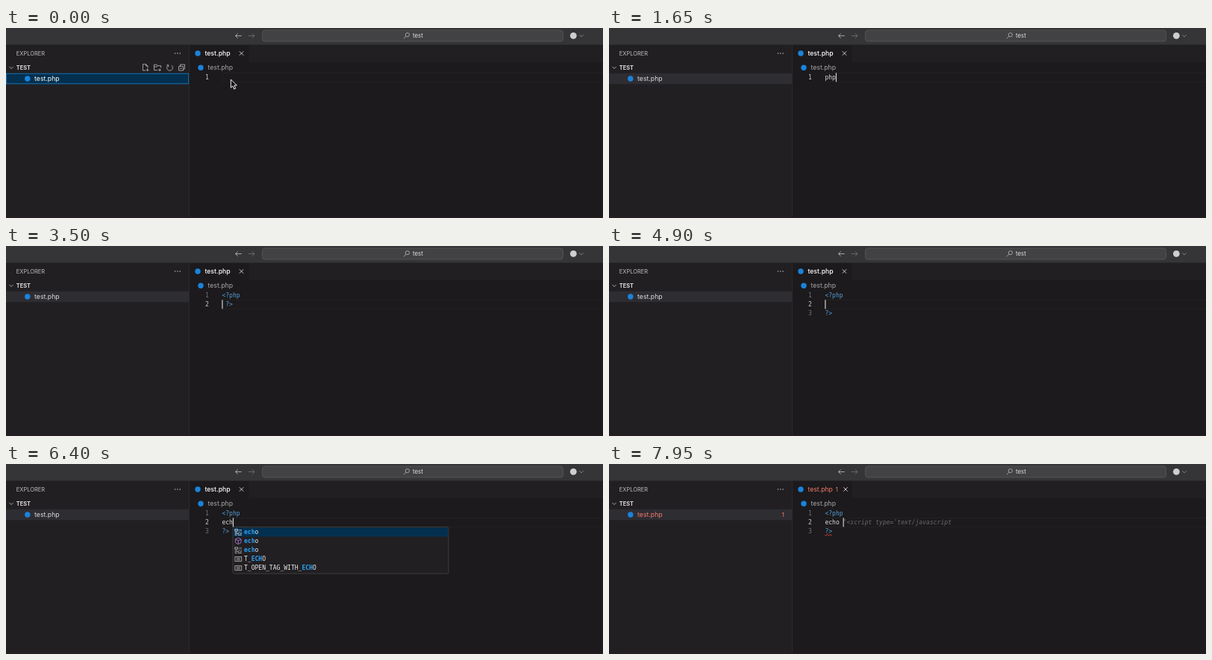
Write an HTML page with a canvas that moves like this. It is 800 px wide and 255 px high and loops after 8000 ms.

```html
<!DOCTYPE html>
<html lang="en">
<head>
<meta charset="utf-8">
<title>Code editor</title>
<style>
html, body { margin: 0; width: 100%; height: 100%; overflow: hidden; background: #1c1a1c; }
canvas { display: block; width: 800px; height: 255px; }
</style>
</head>
<body>
<canvas id="stage"></canvas>
<script>
const W = 800, H = 255, LOOP = 8000;
const canvas = document.getElementById('stage');
const g = canvas.getContext('2d');
const dpr = window.devicePixelRatio || 1;
canvas.width = W * dpr;
canvas.height = H * dpr;

const UI = 'Inter, "Open Sans", sans-serif';
const MONO = '"DejaVu Sans Mono", monospace';
const CODE = `8.05px ${MONO}`;
const CHAR = 4.847, LINE = 12.1, LEFT = 289.4, TOP = 60.2;
const BG = '#1c1a1c', SIDE = '#211f22', BLUE = '#569cd6', RED = '#f17a6c', LIGHT = '#dddcdd', HIT = '#2aa3f8';
const FOCUS = 250, ERROR = 7400;

// time, lines, caret row, caret column
const edits = [
  [FOCUS, [''], 0, 0],
  [1250, ['p'], 0, 1],
  [1400, ['ph'], 0, 2],
  [1600, ['php'], 0, 3],
  [2450, ['<?php  ?>'], 0, 6],
  [3100, ['<?php', ' ?>'], 1, 0],
  [3550, ['<?php', '', ' ?>'], 2, 0],
  [3700, ['<?php', '', '?>'], 2, 0],
  [4500, ['<?php', '', '?>'], 1, 0],
  [6000, ['<?php', 'e', '?>'], 1, 1],
  [6200, ['<?php', 'ec', '?>'], 1, 2],
  [6350, ['<?php', 'ech', '?>'], 1, 3],
  [6500, ['<?php', 'echo', '?>'], 1, 4],
  [6800, ['<?php', 'echo ', '?>'], 1, 5]
];

// first letter: m method, k keyword, c constant, s snippet; brackets mark the match
const menus = [
  { from: 1700, to: 2450, detail: 'php', items: [
    's[php]', 'm[php]_check_syntax', 'm[php]_ini_loaded_file', 'm[php]_ini_scanned_files',
    'm[php]_logo_guid', 'm[php]_sapi_name', 'm[php]_strip_whitespace', 'm[php]_uname',
    'm[php]credits', 'm[php]info', 'm[php]version', 'm[p]cntl_signal_dis[p]atc[h]'] },
  { from: 6050, to: 6200, detail: 'end(object|array &$array): mixed', scroll: true, items: [
    'm[e]nd', 'm[e]xp', 'k[e]cho', 'k[e]num', 'k[e]val', 'k[e]xit', 'm[e]xec', 'k[e]mpty',
    'm[e]xpm1', 'm[e]xplode', 'm[e]xtract', 'm[e]rror_log'] },
  { from: 6200, to: 6350, items: ['k[ec]ho', 'm[ec]ho', 'k[ec]ho', 'cT_[EC]HO', 'cT_OPEN_TAG_WITH_[EC]HO'] },
  { from: 6350, to: 6500, items: ['k[ech]o', 'm[ech]o', 'k[ech]o', 'cT_[ECH]O', 'cT_OPEN_TAG_WITH_[ECH]O'] },
  { from: 6500, to: 6800, items: ['k[echo]', 'm[echo]', 'k[echo]', 'cT_[ECHO]', 'cT_OPEN_TAG_WITH_[ECHO]'] }
];

function text(s, x, y, color, font, align = 'left') {
  g.font = font;
  g.fillStyle = color;
  g.textAlign = align;
  g.fillText(s, x, y);
}

function rect(x, y, w, h, color) {
  g.fillStyle = color;
  g.fillRect(x, y, w, h);
}

function roundBox(x, y, w, h, r, fill, stroke) {
  g.beginPath();
  g.roundRect(x, y, w, h, r);
  if (fill) { g.fillStyle = fill; g.fill(); }
  if (stroke) { g.strokeStyle = stroke; g.lineWidth = 0.8; g.stroke(); }
}

function dot(x, y, r, color) {
  g.fillStyle = color;
  g.beginPath();
  g.arc(x, y, r, 0, Math.PI * 2);
  g.fill();
}

// strokes an SVG path centred on x, y
function icon(d, x, y, color, width = 0.8) {
  g.save();
  g.translate(x, y);
  g.strokeStyle = color;
  g.lineWidth = width;
  g.stroke(new Path2D(d));
  g.restore();
}

const CHEVRON = 'M-2.6-1.3L0 1.4L2.6-1.3';
const CROSS = 'M-2.7-2.7L2.7 2.7M2.7-2.7L-2.7 2.7';
const ARROW = 'M4.2 0H-4M-.8-3.2L-4 0L-.8 3.2';
const kinds = {
  m: ['M0-4.3L3.8-2.3V2.2L0 4.3L-3.8 2.2V-2.3ZM-3.8-2.3L0-.3L3.8-2.3M0-.3V4.3', '#b180d7'],
  k: ['M-4.6-3.6H-.6V-1.4H-4.6ZM1-2.5H4.6M-4.6 .3H-1.4M.2 .3H2M3.2 .3H4.6M-4.6 2.2H1.2M2.6 2.2H4.6M-4.6 4H-2M-.6 4H4.6', '#c5c5c5'],
  c: ['M-4.4-3H4.4V3H-4.4ZM-2.5-1H2.5M-2.5 1H2.5', '#c5c5c5'],
  s: ['M-3.8 3.4V-3.8H3.8V3.4M-3.8 3.9H3.8', '#c5c5c5']
};

function titleBar() {
  rect(0, 0, W, 22.5, '#353436');
  icon(ARROW, 311.5, 10.5, '#c4c3c4');
  icon('M-4.2 0H4M.8-3.2L4 0L.8 3.2', 329, 10.5, '#757476');
  roundBox(343.5, 3, 403, 15, 3.5, '#424143', '#59585a');
  icon('M-3.6 4L-.6 .8M4 -1.2A2.6 2.6 0 1 1 -1.2-1.2A2.6 2.6 0 1 1 4-1.2', 536.5, 10.3, '#c4c3c4', 0.7);
  text('test', 544.9, 13.2, LIGHT, `7.9px ${UI}`);
  dot(760.3, 10.3, 4.4, '#cfcecf');
  icon(CHEVRON, 771, 10.5, '#a5a4a5', 0.7);
}

function sidebar(focused, error) {
  rect(0, 22.5, 245, H, SIDE);
  text('EXPLORER', 13.8, 36.8, '#bfbebf', `7.5px ${UI}`);
  for (let i = -1; i < 2; i++) dot(229.8 + i * 3.3, 34, 0.75, '#c4c3c4');
  icon(CHEVRON, 7, 53.2, '#c4c3c4');
  text('TEST', 13.8, 55.8, LIGHT, `bold 7.4px ${UI}`);
  if (focused) {
    const c = '#bdbcbd';
    icon('M0 4H-3.6V-4.4H.5L3 -2V.4M.5-4.4V-2H3M2.6 1.4V5.2M.7 3.3H4.5', 187, 53, c);
    icon('M0 3.6H-4.6V-3.8H-1L.2-2.4H4.6V.4M-4.6-1H-.8L.4-2.4M3 1.4V5.2M1.1 3.3H4.9', 203, 53, c);
    icon('M-2.2-3.2A3.9 3.9 0 1 0 2.2-3.2M-4.2-3.6H-1.8V-1', 219.5, 53.3, c);
    icon('M-4-1.6H2V4H-4ZM-2-1.6V-4H4V2H2M-2.5 1.2H.5', 235.5, 53, c);
    rect(0, 60.8, 245, 14.4, '#04304f');
    g.strokeStyle = '#1d75b8';
    g.lineWidth = 0.9;
    g.strokeRect(0.5, 61.2, 244.2, 13.6);
  } else {
    rect(0, 60.8, 245, 14.4, '#2e2d32');
  }
  dot(28.8, 68, 3.7, '#1a83dc');
  text('test.php', 38.1, 71, error ? RED : focused ? '#fff' : LIGHT, `8.7px ${UI}`);
  if (error) text('1', 234.8, 71, RED, `8.2px ${UI}`, 'right');
  rect(245, 22.5, 1, H, '#2a282b');
}

function tabs(error) {
  rect(246, 22.5, W, 23.5, SIDE);
  rect(246, 22.5, 79.5, 24, BG);
  dot(257, 34, 3.7, '#1a83dc');
  text('test.php', 266.4, 37.1, error ? RED : '#fff', `${error ? 400 : 500} 8.7px ${UI}`);
  if (error) text('1', 303.6, 37.1, RED, `8.2px ${UI}`);
  icon(CROSS, error ? 317 : 315.5, 34, '#dcdbdc', 0.9);
  dot(261, 53.2, 3.7, '#1a83dc');
  text('test.php', 270.5, 56.3, '#a9a8a9', `8.7px ${UI}`);
}

function ghost(t) {
  if (t < 6650) return;
  const inline = t >= 6800;
  text('"<script type=\'text/javascript', LEFT + 5 * CHAR, TOP + LINE + 8.7,
    inline ? '#696869' : '#7d7c7d', (inline ? 'italic ' : '') + CODE);
}

function squiggle(x, y, w) {
  g.beginPath();
  for (let i = 0; i <= w; i += 0.5) g.lineTo(x + i, y + Math.sin(i * 1.57) * 0.9);
  g.strokeStyle = '#f14c4c';
  g.lineWidth = 0.9;
  g.stroke();
}

function editor(t, lines, row, error) {
  g.strokeStyle = '#252326';
  g.lineWidth = 0.8;
  g.strokeRect(LEFT + 0.6, TOP + row * LINE + 0.4, W, LINE - 0.6);
  lines.forEach((s, i) => {
    const y = TOP + i * LINE + 8.7;
    text(i + 1, 271.8, y, i === row ? '#cccbcc' : '#6f747d', CODE, 'right');
    text(s, LEFT, y, /[<>]/.test(s) ? BLUE : LIGHT, CODE);
  });
  ghost(t);
  if (error) squiggle(LEFT, TOP + 3 * LINE - 1.2, 2 * CHAR);
}

function menu(m, x, y) {
  const w = 289, h = m.items.length * LINE + 2;
  roundBox(x, y, w, h, 1.5, '#211f22', '#454446');
  m.items.forEach((item, i) => {
    const top = y + 0.8 + i * LINE, mid = top + LINE / 2;
    const base = Math.round(mid + 2.5);
    if (!i) rect(x + 0.6, top, w - 1.2, LINE, '#04304f');
    const [path, color] = kinds[item[0]];
    icon(path, x + 7.3, mid - 0.2, i ? color : '#f0f0f0');
    let tx = x + 15;
    item.slice(1).split(/[\[\]]/).forEach((part, j) => {
      text(part, tx, base, j % 2 ? HIT : '#ecebec', (j % 2 ? 'bold ' : '') + CODE);
      tx += part.length * CHAR;
    });
    if (!i && m.detail) text(m.detail, x + w - 7.2, base, LIGHT, `6.85px ${MONO}`, 'right');
  });
  if (m.scroll) rect(x + w - 7, y + 1, 6.6, 13, '#35516a');
}

function pointer(x, y) {
  g.save();
  g.translate(x, y);
  const p = new Path2D('M0 0V11.2L2.6 8.8L4.4 13L6.4 12.1L4.6 8H8Z');
  g.fillStyle = '#111';
  g.fill(p);
  g.strokeStyle = '#f4f4f4';
  g.lineWidth = 1;
  g.stroke(p);
  g.restore();
}

function draw(t) {
  const focused = t < FOCUS, error = t >= ERROR;
  const [at, lines, row, col] = edits.filter(e => e[0] <= t).pop() || edits[0];
  const caretX = LEFT + col * CHAR;

  g.setTransform(dpr, 0, 0, dpr, 0, 0);
  rect(0, 0, W, H, BG);
  editor(t, lines, row, error);
  tabs(error);
  sidebar(focused, error);
  titleBar();
  rect(0, 253.8, W, 1.2, '#2b1b23');

  const m = menus.find(o => t >= o.from && t < o.to);
  if (m) menu(m, caretX, TOP + (row + 1) * LINE + 0.2);
  if (!focused && Math.floor((t - at) / 500) % 2 === 0) {
    rect(caretX - 0.1, TOP + row * LINE, 1.2, LINE, '#d0cfd0');
  }
  if (focused) pointer(301.3, 69);
}

function frame(now) {
  draw(now % LOOP);
  requestAnimationFrame(frame);
}
requestAnimationFrame(frame);
</script>
</body>
</html>
```
